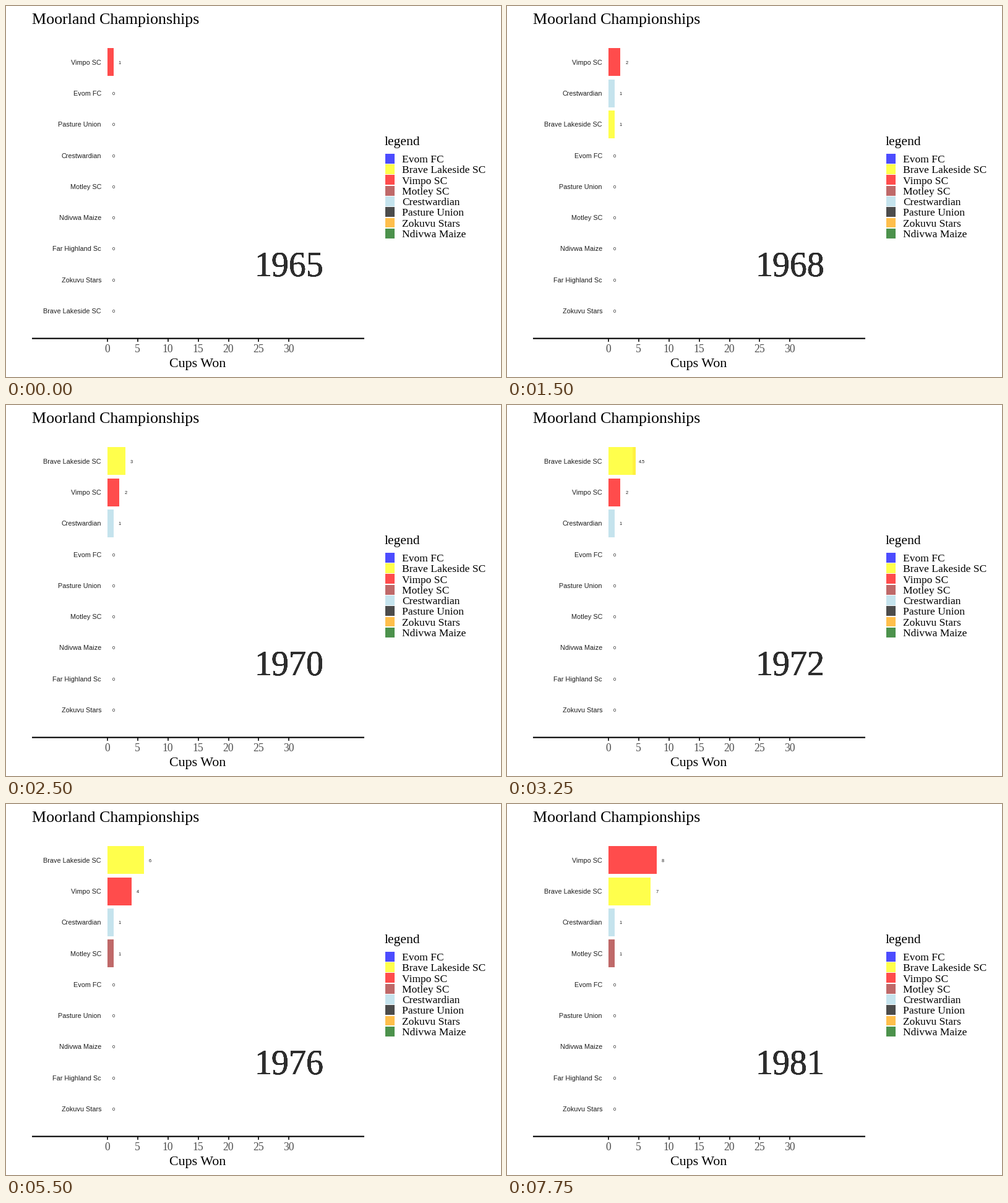
These frames come from a looping animation (800 by 600 pixels, 8 s). A matplotlib script:

```python
import numpy as np
import matplotlib.pyplot as plt
from matplotlib.animation import FuncAnimation
from matplotlib.patches import Rectangle

DPI = 100
SERIF, SANS = "Liberation Serif", "Liberation Sans"
X0, UNIT = 163.9, 9.78             # pixel of zero cups, pixels per cup
ROW0, ROW_STEP, BAR_H = 90.9, 50.25, 45.2
KEY_STEP, KEY_SIZE = 17.28, 15.86
ALPHA = 0.7

# Alphabetical rank of the keys decides ties.
TEAMS = {
    "A": ("Evom FC", "blue"),
    "B": ("Pasture Union", "black"),
    "C": ("Crestwardian", "lightblue"),
    "H": ("Motley SC", "brown"),
    "M": ("Ndivwa Maize", "darkgreen"),
    "P": ("Far Highland Sc", "grey"),
    "S": ("Vimpo SC", "red"),
    "T": ("Zokuvu Stars", "orange"),
    "Y": ("Brave Lakeside SC", "yellow"),
}
LEGEND = "AYSHCBTM"
WINNERS = "SSCYYYYYSYHSSSSSY"      # champions from FIRST_YEAR on
FIRST_YEAR = 1965

# Two steps a year; one year passes in a single step.
STEPS = [s / 2 for s in range(2 * len(WINNERS) - 1) if s != 23]


def standings(i):
    """Cups and row of every team after season i."""
    cups = {k: WINNERS[:i + 1].count(k) for k in TEAMS}
    order = sorted(TEAMS, key=lambda k: (-cups[k], k))
    return cups, {k: order.index(k) for k in TEAMS}


fig = plt.figure(figsize=(800 / DPI, 600 / DPI), dpi=DPI, facecolor="white")
ax = fig.add_axes([0, 0, 1, 1])
ax.set(xlim=(0, 800), ylim=(600, 0))
ax.axis("off")


def text(x, y, s, px, family=SERIF, color="black", ha="left", z=3):
    return ax.text(x, y, s, fontsize=px * 72 / DPI, family=family,
                   color=color, ha=ha, va="baseline", zorder=z)


def box(x, y, w, h, color, alpha=ALPHA, z=1, snap=None):
    return ax.add_patch(Rectangle((x, y), w, h, facecolor=color, alpha=alpha,
                                  linewidth=0, zorder=z, snap=snap))


def draw_static():
    text(42, 29, "Moorland Championships", 26)
    text(310, 584, "Cups Won", 22, ha="center")
    box(42, 536.6, 537, 2.13, "black", 1, 3, snap=False)
    for v in range(0, 31, 5):
        x = X0 + UNIT * v
        box(x - 1, 538, 2, 5, "#333333", 1, 2)
        text(x - 0.6, 560, str(v), 17.6, color="#4d4d4d", ha="center")
    text(612, 225, "legend", 21.6)
    for i, k in enumerate(LEGEND):
        name, color = TEAMS[k]
        y = 246.8 + KEY_STEP * i
        box(613, y - KEY_SIZE / 2, 15.2, KEY_SIZE, color)
        text(640, y + 6.2, name, 17.5)


draw_static()
bars, names, counts = {}, {}, {}
for k, (name, color) in TEAMS.items():
    bars[k] = box(X0, 0, 0, BAR_H, color)
    names[k] = text(154, 0, name, 10.9, SANS, "#1f1f1f", "right")
    counts[k] = text(0, 0, "", 7.4, SANS, "#1f1f1f", "center")
gain = box(0, 0, 0, BAR_H, "orange", 0.15, 2)
# The year is printed once per team, which thickens its edges.
years = [text(457.5, 436.2, "", 56, color="#2d2d2d", ha="center")
         for _ in TEAMS]


def update(n):
    t = STEPS[n]
    lo, hi = int(np.floor(t)), int(np.ceil(t))
    (c0, r0), (c1, r1) = standings(lo), standings(hi)
    gain.set_width(0)
    for k in TEAMS:
        cups = c0[k] + (c1[k] - c0[k]) * (t - lo)
        row = r0[k] + (r1[k] - r0[k]) * (t - lo)
        y = ROW0 + ROW_STEP * row
        end = X0 + UNIT * cups
        bars[k].set_y(y - BAR_H / 2)
        bars[k].set_width(UNIT * cups)
        names[k].set_y(y + 4)
        counts[k].set_position((end + 10, y + 2.9))
        counts[k].set_text(f"{cups:g}")
        # A growing yellow bar shows its new part slightly darker.
        if k == "Y" and cups > c0[k] and r0[k] == r1[k]:
            start = X0 + UNIT * c0[k]
            gain.set_bounds(start, y - BAR_H / 2, end - start, BAR_H)
    for label in years:
        label.set_text(str(FIRST_YEAR + hi))
    return []


anim = FuncAnimation(fig, update, frames=len(STEPS), interval=250,
                     init_func=lambda: update(0), repeat=True, repeat_delay=0)
plt.show()
```
